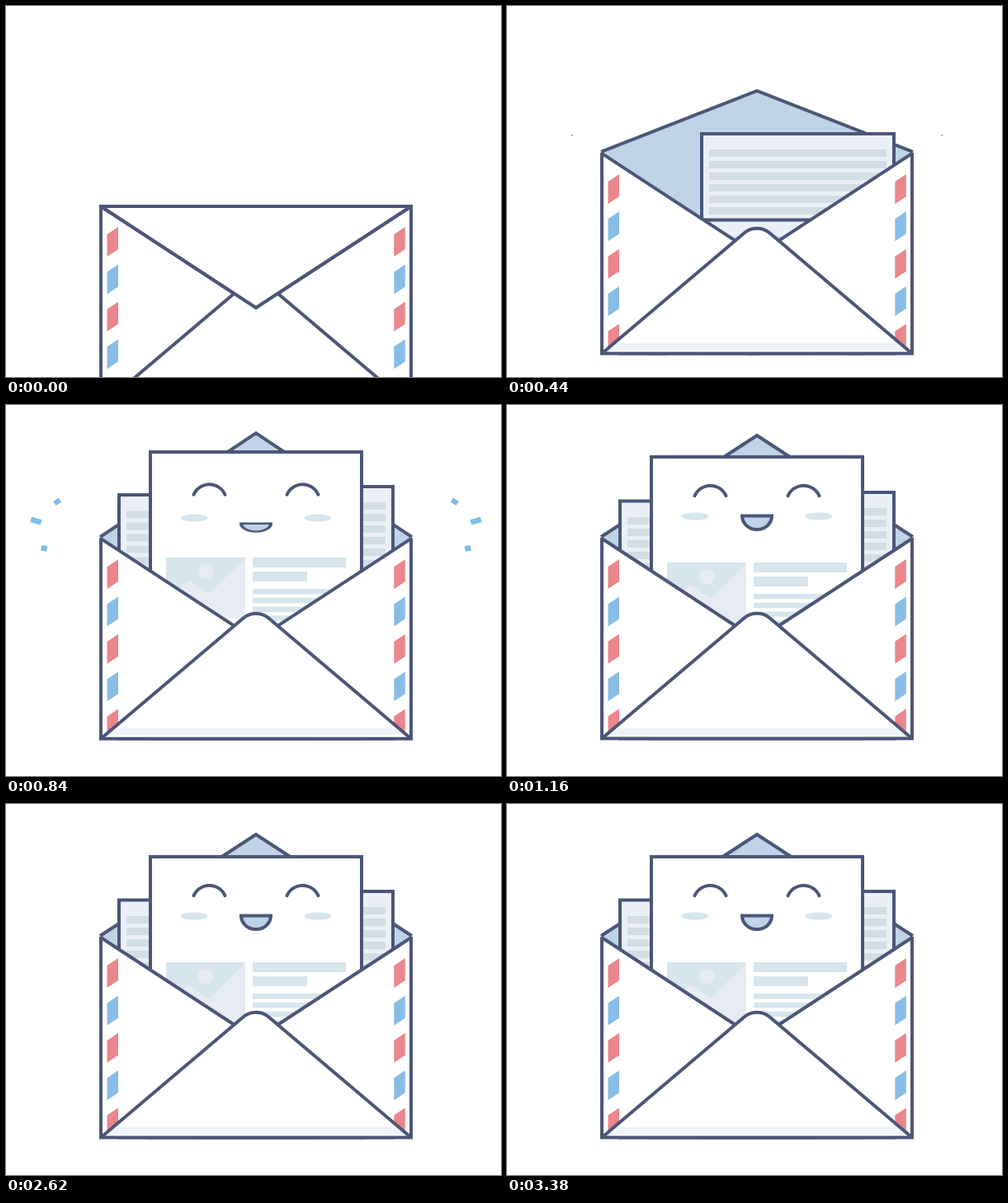
An HTML page with a canvas that plays this animation: 600 px wide and 450 px high, repeating every 3420 ms.

```html
<!DOCTYPE html>
<html lang="en">
<head>
<meta charset="utf-8">
<title>Happy envelope</title>
<style>
  html, body { margin: 0; width: 100%; height: 100%; overflow: hidden; background: #fff; }
  canvas { display: block; }
</style>
</head>
<body>
<canvas id="stage" width="600" height="450"></canvas>
<script>
const ctx = document.getElementById('stage').getContext('2d');
const LOOP = 3420, STEP = 20;
const LEFT = 115, RIGHT = 491, MID = 303, HEIGHT = 242.5;
const INK = '#4b5678', INSIDE = '#bfd3e7', RED = '#ea868c', BLUE = '#87bde7';
const SHEET = '#ebeff8', RULE = '#d3dde4', PALE = '#d7e5ec', HILL = '#e7ebf3';

const clamp = (v, a = 0, b = 1) => Math.min(b, Math.max(a, v));

// The standard CSS "ease" curve.
function ease(x) {
  x = clamp(x);
  let lo = 0, hi = 1;
  for (let i = 0; i < 24; i++) {
    const u = (lo + hi) / 2;
    if (0.75 * u * (1 - u) + u * u * u < x) lo = u; else hi = u;
  }
  return 0.3 * lo * (1 - lo) ** 2 + 3 * lo * lo * (1 - lo) + lo ** 3;
}

// Smooth curve through [time, value] points, flat at both ends.
function track(keys, t) {
  const n = keys.length - 1;
  if (t <= keys[0][0]) return keys[0][1];
  if (t >= keys[n][0]) return keys[n][1];
  let i = 0;
  while (t >= keys[i + 1][0]) i++;
  const slope = k => k === 0 || k === n ? 0
    : (keys[k + 1][1] - keys[k - 1][1]) / (keys[k + 1][0] - keys[k - 1][0]);
  const [t0, a] = keys[i], [t1, b] = keys[i + 1], d = t1 - t0, u = (t - t0) / d;
  const s = u * u * (3 - 2 * u);
  return a + (b - a) * s + d * u * (1 - u) * ((1 - u) * slope(i) - u * slope(i + 1));
}

const FLAP = [[60, 123], [200, 111], [280, 83], [360, 4], [440, -76], [540, -118.5],
  [660, -129], [840, -128], [1080, -125]];
const RISE = [[0, 230], [80, 143], [160, 49], [260, 9], [400, -7], [480, -7.5],
  [560, -7], [720, -1], [820, 0]];
const SETTLE = [[560, 1.7], [840, 1], [1080, 0]];

function poly(points, fill, stroke, open) {
  ctx.beginPath();
  points.forEach(([x, y]) => ctx.lineTo(x, y));
  if (!open) ctx.closePath();
  if (fill) { ctx.fillStyle = fill; ctx.fill(); }
  if (stroke) { ctx.strokeStyle = stroke; ctx.stroke(); }
}

function bar(x, y, w, h, fill) {
  ctx.fillStyle = fill;
  ctx.fillRect(x, y, w, h);
}

function ellipse(x, y, rx, ry, fill) {
  ctx.beginPath();
  ctx.ellipse(x, y, rx, ry, 0, 0, Math.PI * 2);
  ctx.fillStyle = fill;
  ctx.fill();
}

function sheet(x, w, y, bottom, fill) {
  bar(x, y, w, bottom - y, fill);
  ctx.strokeStyle = INK;
  ctx.strokeRect(x, y, w, bottom - y);
}

function ruledSheet(x, y, bottom, first) {
  sheet(x, 233, y, bottom, SHEET);
  for (let ly = y + first; ly < bottom - 12; ly += 14) bar(x + 9, ly, 215, 9, RULE);
}

function face(t) {
  const lag = track(SETTLE, t);
  ctx.strokeStyle = INK;
  ctx.lineCap = 'round';
  for (const side of [-1, 1]) {
    const half = 66.5 * Math.PI / 180;
    ctx.beginPath();
    ctx.arc(MID + side * 56.5, 55.5 + 4.5 * lag, 20.7, -Math.PI / 2 - half, -Math.PI / 2 + half);
    ctx.stroke();
    ellipse(MID + side * 75, 72 + 8 * lag, 16.5, 4.5, PALE);
  }
  ctx.lineCap = 'butt';

  ctx.save();
  ctx.translate(MID, 69.5 + 16 * lag);
  ctx.scale(1, Math.max(0.15, 1 - 0.4 * lag));
  ctx.beginPath();
  ctx.moveTo(-18, 2);
  ctx.lineTo(18, 2);
  ctx.ellipse(0, 2, 18, 16.5, 0, 0, Math.PI);
  ctx.closePath();
  ctx.fillStyle = INSIDE;
  ctx.fill();
  ctx.stroke();
  ctx.restore();
}

function letter(t, y, bottom) {
  sheet(175, 256, y, bottom, '#fff');
  ctx.save();
  ctx.beginPath();
  ctx.rect(177, y + 2, 252, bottom - y);
  ctx.clip();
  ctx.translate(0, y);
  bar(194, 128, 96, 74, PALE);
  ellipse(242, 145, 9.3, 9.3, HILL);
  poly([[194, 180], [222, 155], [246, 172], [290, 129], [290, 202], [194, 202]], HILL);
  bar(299, 128, 113, 12, PALE);
  bar(299, 145, 66, 12, PALE);
  for (let i = 0; i < 5; i++) bar(299, 166 + i * 10.8, 113, 6.5, PALE);
  face(t);
  ctx.restore();
}

function stripes() {
  for (const x of [122.5, 470.3]) {
    for (let i = 0; i < 5; i++) {
      const y = 25 + i * 45.4;
      poly([[x, y + 9], [x + 13.5, y], [x + 13.5, y + 27], [x, y + 36]], i % 2 ? BLUE : RED);
    }
  }
}

function front() {
  poly([[LEFT, 0], [MID, 123], [RIGHT, 0], [RIGHT, HEIGHT], [LEFT, HEIGHT]], '#fff');
  stripes();
  poly([[LEFT, 0], [277, 106]], null, INK, true);
  poly([[RIGHT, 0], [329, 106]], null, INK, true);

  ctx.save();
  ctx.beginPath();
  ctx.moveTo(LEFT, HEIGHT);
  ctx.lineTo(288, 96);
  ctx.bezierCurveTo(296, 89, 310, 89, 318, 96);
  ctx.lineTo(RIGHT, HEIGHT);
  ctx.fillStyle = '#fff';
  ctx.fill();
  ctx.strokeStyle = INK;
  ctx.save();
  ctx.clip();
  bar(LEFT, 230, RIGHT - LEFT, 8, '#eef3f9');
  ctx.restore();
  ctx.stroke();
  ctx.restore();
  poly([[LEFT, -1], [LEFT, HEIGHT], [RIGHT, HEIGHT], [RIGHT, -1]], null, INK, true);
}

function sparks(t) {
  const age = t - 440;
  if (age < 0 || t > 1120) return;
  const go = 1 - (1 - clamp(age / 500)) ** 3;
  const size = track([[430, 0.2], [600, 1.25], [840, 1], [1120, 0]], t);
  // dx, dy, width, height, angle
  const bits = [[-17, -40, 8, 6, -0.6], [-43, -16.5, 13, 6.5, 0.28], [-33, 17, 7, 7, 0.15]];
  for (const side of [1, -1]) {
    for (const [dx, dy, w, h, a] of bits) {
      ctx.save();
      ctx.translate(MID, 0);
      ctx.scale(side, 1);
      ctx.translate(79 - MID + dx * go, 157 + dy * go);
      ctx.rotate(a);
      ctx.scale(size, size);
      bar(-w / 2, -h / 2, w, h, '#7dbdea');
      ctx.restore();
    }
  }
}

function draw(t) {
  const top = 162 + 81 * (1 - ease(t / 900));
  const tip = track(FLAP, t), bottom = top + HEIGHT;
  bar(0, 0, 600, 450, '#fff');
  ctx.lineWidth = 4;
  ctx.lineJoin = 'miter';
  sparks(t);

  ctx.save();
  ctx.translate(0, top);
  bar(LEFT, 0, RIGHT - LEFT, HEIGHT, INSIDE);
  if (tip < 0) {
    const base = Math.max(-2, tip);
    poly([[LEFT, 0], [LEFT, base], [MID, tip], [RIGHT, base], [RIGHT, 0]], INSIDE);
    poly([[LEFT - 1, base], [MID, tip], [RIGHT + 1, base]], null, INK, true);
  }
  ctx.restore();

  ruledSheet(236, 106 + track(RISE, t - 280), bottom, 19);
  ruledSheet(137, 116.5 + track(RISE, t - 360), bottom, 19.5);
  letter(t, 64 + track(RISE, t - 440), bottom);

  ctx.save();
  ctx.translate(0, top);
  front();
  if (tip >= 0) {
    poly([[LEFT, 0], [MID, tip], [RIGHT, 0]], '#fff');
    poly([[LEFT, 0], [MID, tip], [RIGHT, 0]], null, INK, true);
    bar(LEFT - 2, -2, RIGHT - LEFT + 4, 4, INK);
  }
  ctx.restore();
}

const start = performance.now();
function tick() {
  const t = (performance.now() - start) % LOOP;
  draw(Math.floor(t / STEP) * STEP);
  requestAnimationFrame(tick);
}
tick();
</script>
</body>
</html>
```
